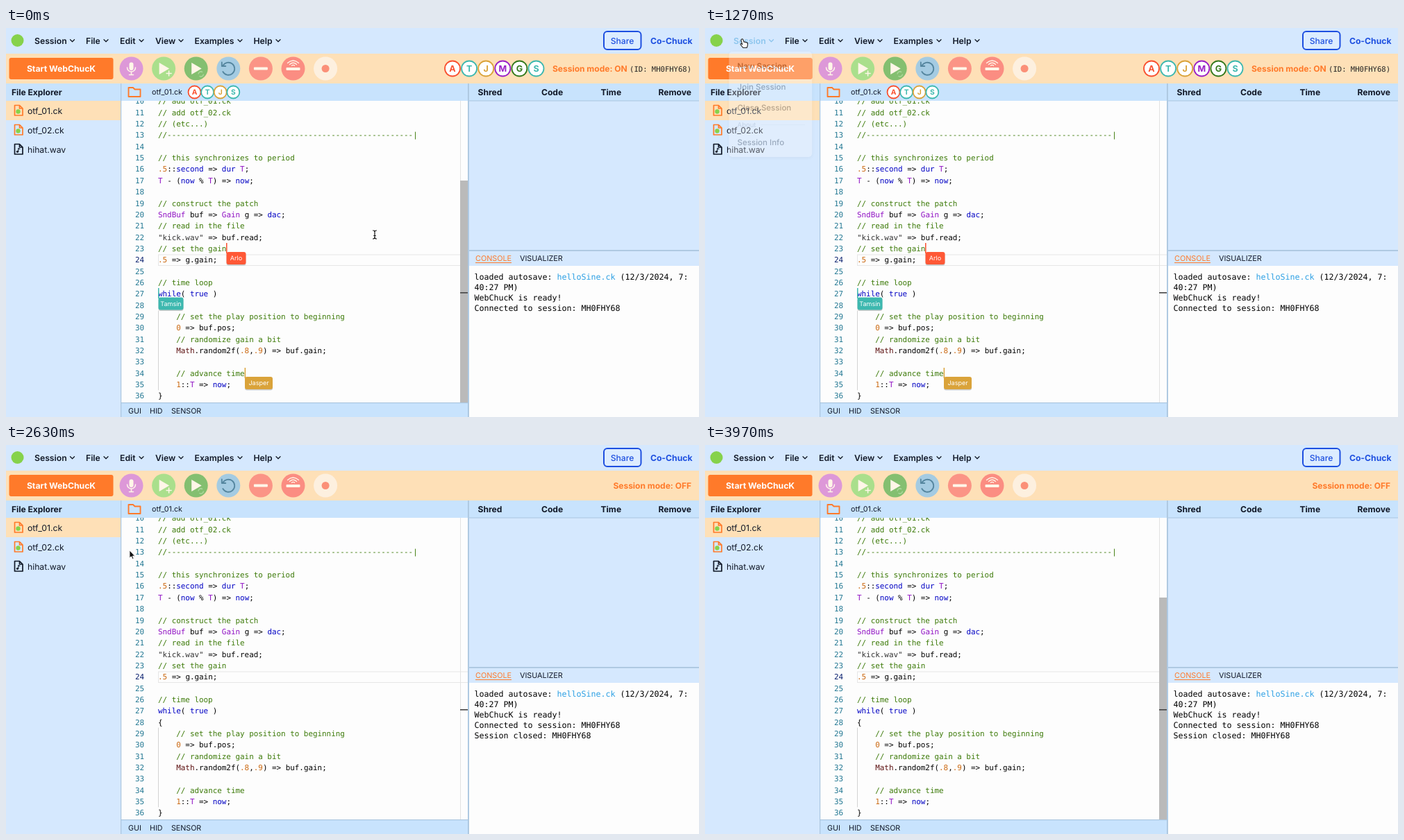
An HTML page that plays this animation: 998x561 px, repeating every 4000 ms.

```html
<!DOCTYPE html>
<html lang="en">
<head>
<meta charset="utf-8">
<title>Shared coding session</title>
<style>
html, body { margin: 0; width: 100%; height: 100%; overflow: hidden; background: #d5e8fe; }
svg { display: block; width: 998px; height: 561px; }
text { font-family: Inter, sans-serif; white-space: pre; text-rendering: geometricPrecision; }
.mono { font-family: "DejaVu Sans Mono", monospace; }
</style>
</head>
<body>
<svg id="stage" viewBox="0 0 998 561"></svg>
<script>
const INK = '#111827', ORANGE = '#ff7a2a', BLUE = '#1d4fe0', HEAD = '#c8e3fd', EDGE = '#abc6df';
const RED = '#f9502f', TEAL = '#3db8af', GOLD = '#daa33a';

const rect = (x, y, w, h, fill, more = '') =>
  `<rect x="${x}" y="${y}" width="${w}" height="${h}" fill="${fill}" ${more}/>`;
const disc = (x, y, r, fill, more = '') => `<circle cx="${x}" cy="${y}" r="${r}" fill="${fill}" ${more}/>`;
const line = (d, stroke, width = 1.5, more = '') =>
  `<path d="${d}" fill="none" stroke="${stroke}" stroke-width="${width}" stroke-linecap="round" stroke-linejoin="round" ${more}/>`;
const shape = (d, fill) => `<path d="${d}" fill="${fill}"/>`;
const text = (x, y, s, size = 12.2, weight = 400, fill = INK, more = '') =>
  `<text x="${x}" y="${y}" font-size="${size}" font-weight="${weight}" fill="${fill}" ${more}>${s}</text>`;
const mono = (x, y, s, size, fill = '#000', more = '') => text(x, y, s, size, 400, fill, `class="mono" ${more}`);
const group = (id, body) => `<g id="${id}">${body}</g>`;
const at = (x, y, body) => `<g transform="translate(${x} ${y})">${body}</g>`;
const MID = 'text-anchor="middle"', END = 'text-anchor="end"';

const badge = (x, y, r, letter, color) =>
  disc(x, y, r, '#fff', `stroke="${color}" stroke-width="1.8"`) +
  text(x, y + r * .4, letter, r * 1.14, 700, color, MID);

// Editor
const FIRST = 10;
const code = `// add otf_01.ck
// add otf_02.ck
// (etc...)
//${'-'.repeat(54)}|

// this synchronizes to period
.5::second => dur T;
T - (now % T) => now;

// construct the patch
SndBuf buf => Gain g => dac;
// read in the file
"kick.wav" => buf.read;
// set the gain
.5 => g.gain;

// time loop
while( true )
{
    // set the play position to beginning
    0 => buf.pos;
    // randomize gain a bit
    Math.random2f(.8,.9) => buf.gain;

    // advance time
    1::T => now;
}`.split('\n');

const rules = [
  [/^\/\/.*/, '#3c7a08'],
  [/^"[^"]*"/, '#333'],
  [/^(second|dur|now|while|true|dac)\b/, '#0000c4'],
  [/^(SndBuf|Gain|T)\b/, '#9012c4'],
  [/^Math\b/, '#5c1010'],
  [/^\.?\d+/, '#cb6810'],
  [/^(\w+|\s+|.)/, '#000']
];
function highlight(s) {
  let out = '';
  while (s) {
    const [rule, color] = rules.find(([r]) => r.test(s));
    const word = s.match(rule)[0];
    out += `<tspan fill="${color}">${word.replace(/>/g, '&gt;')}</tspan>`;
    s = s.slice(word.length);
  }
  return out;
}
const codeRow = (s, i) => {
  const n = FIRST + i, y = 109.4 + i * 16.345;
  return mono(199, y, n, 10.9, n === 24 ? '#0b216f' : '#237893', END) + mono(219, y, highlight(s), 10.9);
};
const tag = (id, x, y, w, name, color) => group(id,
  rect(x, y + 1.5, w, 18, '#0003', 'rx="3"') + rect(x, y, w, 18, color, 'rx="3"') +
  text(x + w / 2, y + 12.4, name, 9, 400, '#fff', MID));

const editor =
  rect(166, 105, 499, 435, '#fdfdfd') +
  `<clipPath id="view"><rect x="166" y="105" width="499" height="435"/></clipPath><g clip-path="url(#view)">` +
  rect(219.5, 327, 446, 15.5, 'none', 'stroke="#e6e6e6"') +
  line('M219.5 408V522', '#d3d3d3', 1) + line('M654.5 105V540', '#e2e2e2', 1) +
  code.map(codeRow).join('') + '</g>' +
  group('scroll', rect(654, 220, 11, 320, '#bababa')) +
  rect(654, 381, 11, 1.6, '#444') +
  group('carets', rect(317, 310, 1.5, 15, RED) + rect(219, 375, 1.5, 15, TEAL) + rect(343.6, 490, 1.5, 15, GOLD)) +
  group('tags', tag('tagA', 317.5, 323, 28, 'Arlo', '#ff5836') +
    tag('tagT', 219.5, 388.5, 36, 'Tamsin', TEAL) + tag('tagJ', 344, 503, 40, 'Jasper', GOLD));

// Header and toolbar
const menus = [['Session', 41, 95.5], ['File', 115, 144], ['Edit', 164, 195],
  ['View', 215, 252], ['Examples', 271.5, 337], ['Help', 356.5, 392]];
const header = disc(16.5, 18, 9, '#86d24b') +
  menus.map(([s, x, c], i) => `<g class="menu" color="${INK}">` +
    text(x, 22.5, s, 12.2, 600, 'currentColor') + line(`M${c - 3} 16.7l3 3 3-3`, 'currentColor', 1.3) + '</g>').join('') +
  rect(861, 5, 53.5, 26, '#dcecff', `rx="5" stroke="${BLUE}" stroke-width="2"`) +
  text(887.5, 22.5, 'Share', 12.1, 500, BLUE, MID) + text(988.5, 22.5, 'Co-Chuck', 12.2, 700, BLUE, END);

const WHITE = '#fff6e8', play = shape('M-6.5-8.5L8 0-6.5 8.5Z', WHITE);
const buttons = [
  ['#dd98d8', rect(-3, -9, 6, 11.5, WHITE, 'rx="3"') + line('M-6-1.5A6 6 0 0 0 6-1.5M0 4.8V9M-3 9H3', WHITE)],
  ['#aadf8c', play + line('M7.5 3.5V10.5M4 7H11', WHITE)],
  ['#84bf70', play + disc(7, 8, 3.6, 'none', 'stroke="#a9d69a" stroke-width="1.6" stroke-dasharray="8 3"')],
  ['#a4cbe2', line('M-8-4A9 9 0 1 1-8 4.5M-9.5-9V-3.5H-4', '#55869f', 1.8)],
  ['#fb9486', rect(-10, -2, 20, 4, WHITE, 'rx="1"')],
  ['#fb8d82', rect(-10, -1.5, 20, 4, WHITE, 'rx="1"') +
    line('M-8-8Q0-15 8-8M-5-6Q0-10.5 5-6M-2-4.2Q0-6 2-4.2', WHITE, 1.3)],
  ['#fdf0df', disc(0, 0, 5.5, '#fb9078')]
];
const people = [['A', RED], ['T', TEAL], ['J', GOLD], ['M', '#9a1fc6'], ['G', '#34791c'], ['S', TEAL]];
const toolbar = rect(0, 37, 998, 43, '#fee0b7') +
  rect(4.5, 43, 150, 31, ORANGE, 'rx="3"') + text(79.5, 63, 'Start WebChucK', 12.2, 700, '#fff', MID) +
  buttons.map(([c, icon], i) => at(180.5 + i * 46.6, 58.5, disc(0, 0, 17, c) + icon)).join('') +
  group('online', people.map(([s, c], i) => badge(643 + i * 24.1, 58.5, 11, s, c)).join('') +
    text(787, 63, 'Session mode: ON', 12, 700, ORANGE) + mono(987, 63, '(ID: MH0FHY68)', 10.55, '#222', END)) +
  group('offline', text(987, 63, 'Session mode: OFF', 12, 700, ORANGE, END));

// Side panels
const page = (y, color, mark) => at(11.5, y,
  line('M1 1H8L12.5 5.5V15.5H1ZM8 1V5.5H12.5', color, 1.7) + mark);
const files = rect(0, 80, 165, 25, HEAD) + text(8, 97, 'File Explorer', 12, 700) +
  rect(0, 105, 165, 28, '#fee0b7') +
  page(110.5, ORANGE, disc(6, 10, 3.2, '#86d24b')) + page(138.5, ORANGE, disc(6, 10, 3.2, '#86d24b')) +
  page(166.5, INK, disc(5, 11.8, 1.6, INK) + line('M6.3 11.5V7L8.5 8', INK, 1.1)) +
  ['otf_01.ck', 'otf_02.ck', 'hihat.wav'].map((s, i) => text(31, 123.5 + i * 28, s)).join('');

const tabs = rect(166, 80, 499, 25, HEAD) +
  line('M176.5 86H183L185.5 88.5H193.5V99H176.5Z', ORANGE, 1.9) + text(210, 96.3, 'otf_01.ck', 10.7) +
  group('editors', [0, 1, 2, 5].map((p, i) => badge(271.5 + i * 18.6, 92.5, 9, ...people[p])).join('')) +
  rect(166, 540, 499, 21, HEAD) + rect(166, 539.7, 499, 1.5, EDGE) +
  [['GUI', 176], ['HID', 207], ['SENSOR', 238]].map(([s, x]) => text(x, 556, s, 10.7)).join('');

const log = ['', '40:27 PM)', 'WebChucK is ready!', 'Connected to session: MH0FHY68'];
const side = rect(667, 80, 331, 25, HEAD) + rect(667, 104.5, 331, 1, EDGE) +
  [['Shred', 679.5], ['Code', 771], ['Time', 856.5]].map(([s, x]) => text(x, 97.3, s, 12.1, 700)).join('') +
  text(987, 97.3, 'Remove', 12.1, 700, INK, END) +
  rect(667, 320, 331, 1.8, EDGE) +
  text(676, 336.3, 'CONSOLE', 10.8, 400, ORANGE) + rect(676, 338, 52, 1, ORANGE) + text(740, 336.3, 'VISUALIZER', 10.8) +
  rect(667, 343, 331, 218, '#fdfdfd') +
  mono(674.5, 363, 'loaded autosave: <tspan fill="#2da0e4">helloSine.ck</tspan> (12/3/2024, 7:', 11.63) +
  log.map((s, i) => mono(674.5, 363 + i * 14.9, s, 11.63)).join('') +
  group('closed', mono(674.5, 422.6, 'Session closed: MH0FHY68', 11.63)) +
  rect(165, 80, 1.2, 481, EDGE) + rect(665, 80, 1.8, 481, EDGE);

const dropdown = group('drop',
  rect(34.5, 34.5, 124.5, 158.5, '#0002', 'rx="5" filter="url(#soft)"') +
  rect(34.5, 34, 124, 157.5, '#fcfcfd', 'rx="5"') +
  `<rect id="hover" x="34.5" width="124" height="31" fill="#f3f4f6"/>` +
  [['New Session', 60], ['Join Session', 91.2], ['Close Session', 122.4], ['Session Info', 174]]
    .map(([s, y]) => text(47, y, s, 11.95, 500)).join('') +
  text(47, 147.5, 'About', 9.9, 400, '#9ca3af') + rect(82, 143, 66, 1, '#e5e7eb'));

const pointers =
  group('ibeam', line('M-2.5-6Q0-6 0-4V4Q0 6-2.5 6M2.5-6Q0-6 0-4M0 4Q0 6 2.5 6M-1.3 1.5H1.3', '#fff', 3) +
    line('M-2.5-6Q0-6 0-4V4Q0 6-2.5 6M2.5-6Q0-6 0-4M0 4Q0 6 2.5 6M-1.3 1.5H1.3', '#111', 1.2)) +
  group('hand', `<path d="M-3.6-5.5Q-2.3-7-1.2-5.2L.2-1.6Q1.5-2.6 2.3-1.2 3.6-2 4.2-.6 5.4-1 5.6.6L5.2 3.8 4.2 6.5H-1.2L-4.8 2Q-5.2.4-3.6.6L-2.2 1.8-4-3.8Z"
    fill="#fff" stroke="#222" stroke-width="1.1" stroke-linejoin="round"/>`) +
  group('arrow', `<path d="M-3-6V5L-.5 2.8 1.2 6.6 3 5.8 1.4 2.2H4.8Z" fill="#111" stroke="#fff" stroke-width=".9"/>`);

document.getElementById('stage').innerHTML =
  '<filter id="soft" x="-20%" y="-20%" width="140%" height="140%"><feGaussianBlur stdDeviation="3"/></filter>' +
  rect(0, 0, 998, 561, '#d5e8fe') + header + toolbar + files + tabs + editor + side + dropdown + group('pointer', pointers);

const $ = id => document.getElementById(id);
const show = (id, on) => $(id).setAttribute('opacity', +on);
const ramp = (t, a, b) => Math.min(1, Math.max(0, (t - a) / (b - a)));
const smooth = p => p * p * (3 - 2 * p);
const session = document.querySelector('.menu');

// Pointer stops: arrival start, arrival end, x, y
const stops = [[310, 1010, 56, 22], [1360, 1620, 122, 71], [1800, 2180, 94, 127], [2500, 2960, 535, 284]];
const CLOSE = 2440, LEAVE = 2540;

function draw(t) {
  let x = 531, y = 298;
  for (const [a, b, px, py] of stops) {
    const p = smooth(ramp(t, a, b));
    x += (px - x) * p;
    y += (py - y) * p;
  }
  $('pointer').setAttribute('transform', `translate(${x} ${y})`);
  show('pointer', 1 - ramp(t, 3600, 3750));

  const open = t > 1255 && t < CLOSE;
  const kind = x > 200 && y > 105 ? 'ibeam' : open || (y < 80 && x < 155) ? 'hand' : 'arrow';
  for (const id of ['ibeam', 'hand', 'arrow']) show(id, id === kind);
  session.setAttribute('color', y < 34 && x < 105 ? '#8cc5ed' : INK);

  const p = (1 - (1 - ramp(t, 1255, 1355)) ** 2) * (1 - ramp(t, CLOSE, CLOSE + 75));
  show('drop', p);
  $('drop').setAttribute('transform', `translate(34.5 34) scale(${.95 + .05 * p}) translate(-34.5 -34)`);
  const row = Math.floor((y - 40) / 31.2);
  show('hover', row >= 0 && row < 3);
  $('hover').setAttribute('y', 40 + row * 31.2);

  const live = t < LEAVE;
  for (const id of ['online', 'editors', 'tags']) show(id, live);
  show('offline', !live);
  show('closed', !live);
  show('carets', live && t % 1000 < 500);
  show('tagA', t < 2000);
  show('scroll', t < 2000 ? 1 - ramp(t, 850, 1250) : ramp(t, 2640, 2740));
}
function tick() {
  draw(performance.now() % 4000);
  requestAnimationFrame(tick);
}
tick();
</script>
</body>
</html>
```
